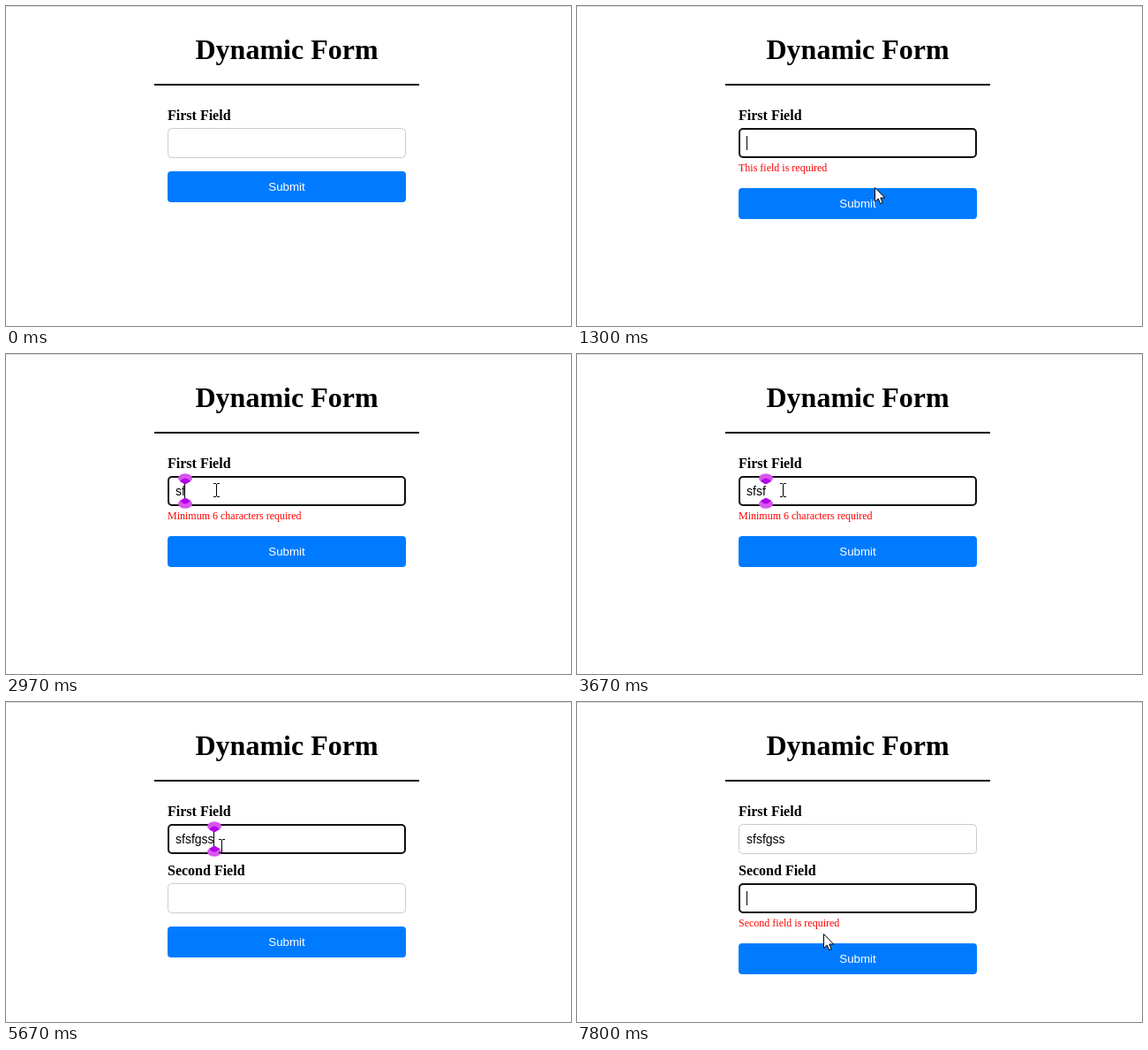
An HTML page with a canvas that plays this animation: 640 px wide and 362 px high, repeating every 8000 ms.

```html
<!DOCTYPE html>
<html lang="en">
<head>
<meta charset="utf-8">
<title>Dynamic Form</title>
<style>
html, body { margin: 0; width: 100%; height: 100%; overflow: hidden; background: #fff; }
canvas { display: block; }
</style>
</head>
<body>
<canvas id="stage" width="640" height="362"></canvas>
<script>
const ctx = document.getElementById('stage').getContext('2d');
const LOOP = 8000, BLINK = 515;
const SERIF = '"Liberation Serif", "Times New Roman", serif';
const SANS = '"Liberation Sans", Arial, sans-serif';
const LEFT = 183, WIDTH = 270, TEXT_X = 192;
const FIRST_Y = 138, SECOND_Y = 205;

// Time, typed text
const typing = [[2770, 's'], [2900, 'sf'], [3030, 'sfs'], [3155, 'sfsf'],
  [5130, 'sfsfg'], [5430, 'sfsfgs'], [5615, 'sfsfgss']];

// Time, pointer x, pointer y
const route = [[470, 331, 325], [700, 336, 169], [870, 339, 217],
  [1030, 339, 217], [1100, 337, 205], [1600, 337, 205], [1970, 238, 154],
  [3080, 238, 154], [3230, 233, 154], [3670, 233, 154], [3800, 247, 182],
  [4030, 247, 182], [4110, 255, 186], [4230, 247, 166], [4530, 247, 166],
  [4730, 244, 163], [6690, 244, 163], [6900, 199, 225],
  [7060, 199, 225], [7330, 279, 262]];

const arrowShape = new Path2D('M.5 .5V16.5L4.2 13L6.7 18.6L9.2 17.5L6.8 12H11.7Z');
const handShape = new Path2D('M-2 14V1.9a1.8 1.8 0 0 1 3.6 0V7.5a1.6 1.6 0 0 1 3.2 .5' +
  'a1.6 1.6 0 0 1 3.2 .7a1.4 1.4 0 0 1 2.6 1V15q0 3-2 6.5H-1q-1-3-4.1-7.5' +
  'q-1-2 .6-2.6q1.4-.3 2.5 2.6z');

function pointerAt(t) {
  if (t < route[0][0]) return null;
  let i = route.length - 1;
  while (route[i][0] > t) i--;
  const [t0, x0, y0] = route[i];
  if (i === route.length - 1) return { x: x0, y: y0 };
  const [t1, x1, y1] = route[i + 1];
  const p = (t - t0) / (t1 - t0);
  const k = p * p * (3 - 2 * p);
  return { x: Math.round(x0 + (x1 - x0) * k), y: Math.round(y0 + (y1 - y0) * k) };
}

function stateAt(t) {
  let value = '', reset = 1300;
  for (const [time, text] of typing) {
    if (t >= time) { value = text; reset = time; }
  }
  if (t >= 7800) reset = 7800;
  const two = value.length >= 6;
  let focus = 0;
  if (t >= 7800) focus = 2;
  else if (t >= 1300 && t < 7700) focus = 1;
  let error = '';
  if (t >= 7800) error = 'Second field is required';
  else if (t >= 1300 && !two) error = value ? 'Minimum 6 characters required' : 'This field is required';
  const lastY = two ? SECOND_Y : FIRST_Y;
  return { value, two, focus, error, lastY,
    buttonY: lastY + (error ? 68 : 49),
    caretOn: Math.floor((t - reset) / BLINK) % 2 === 0,
    pointer: pointerAt(t) };
}

function write(text, x, y, font, color = '#000', align = 'left') {
  ctx.font = font;
  ctx.fillStyle = color;
  ctx.textAlign = align;
  ctx.fillText(text, x, y);
}

function roundBox(x, y, w, h, r) {
  ctx.beginPath();
  ctx.roundRect(x, y, w, h, r);
}

function inside(p, x, y, w, h) {
  return p.x >= x && p.x < x + w && p.y >= y && p.y < y + h;
}

function drawField(label, y, value, focused, caretOn) {
  write(label, LEFT, y - 9, 'bold 16px ' + SERIF);
  const inset = focused ? 1 : 0.5;
  roundBox(LEFT + inset, y + inset, WIDTH - 2 * inset, 34 - 2 * inset, 4);
  ctx.lineWidth = 2 * inset;
  ctx.strokeStyle = focused ? '#101010' : '#ccc';
  ctx.stroke();
  write(value, TEXT_X, y + 22, '14px ' + SANS);
  const caretX = Math.floor(TEXT_X + ctx.measureText(value).width);
  if (focused && caretOn) ctx.fillRect(caretX, y + 9, 1, 16);
  return caretX;
}

function drawMarker(x, y, dir) {
  ctx.save();
  ctx.translate(x, y);
  ctx.scale(1, dir);
  ctx.fillStyle = '#d855ee';
  ctx.beginPath();
  ctx.ellipse(0, 5.5, 8, 5.2, 0, 0, Math.PI * 2);
  ctx.fill();
  ctx.fillStyle = '#b400e6';
  ctx.beginPath();
  ctx.moveTo(-6, 9);
  ctx.quadraticCurveTo(0, 2, 6, 9);
  ctx.lineTo(1, 12);
  ctx.lineTo(-1, 12);
  ctx.fill();
  ctx.restore();
}

function drawPopup(alpha) {
  ctx.save();
  ctx.globalAlpha = alpha;
  ctx.fillStyle = '#fff';
  ctx.shadowColor = 'rgba(0,0,0,.28)';
  ctx.shadowBlur = 4;
  ctx.shadowOffsetY = 1;
  roundBox(282, 181, 156, 44, 7);
  ctx.fill();
  ctx.shadowColor = 'transparent';
  ctx.beginPath();
  ctx.moveTo(296, 182);
  ctx.lineTo(305, 175);
  ctx.lineTo(314, 182);
  ctx.fill();
  write('gjfgj', 294, 208, '14px "Open Sans", "Noto Sans", sans-serif', '#202124');
  ctx.strokeStyle = '#474747';
  ctx.lineWidth = 1.7;
  ctx.beginPath();
  ctx.moveTo(411.5, 198.5);
  ctx.lineTo(420.5, 207.5);
  ctx.moveTo(420.5, 198.5);
  ctx.lineTo(411.5, 207.5);
  ctx.stroke();
  ctx.restore();
}

function drawIBeam() {
  ctx.fillStyle = '#000';
  ctx.fillRect(0, -7, 1, 14);
  for (const y of [-8, 7]) {
    ctx.fillRect(-3, y, 3, 1);
    ctx.fillRect(1, y, 3, 1);
  }
}

function drawPointer(p, s, hover) {
  const overText = inside(p, LEFT, FIRST_Y, WIDTH, 34) ||
    inside(p, LEFT, 115, 72, 18) ||
    s.two && (inside(p, LEFT, SECOND_Y, WIDTH, 34) || inside(p, LEFT, 182, 88, 18)) ||
    s.error && inside(p, LEFT, s.lastY + 38, 150, 15);
  ctx.save();
  ctx.translate(p.x, p.y);
  if (overText) {
    drawIBeam();
  } else {
    const shape = hover ? handShape : arrowShape;
    ctx.fillStyle = '#fff';
    ctx.fill(shape);
    ctx.strokeStyle = '#000';
    ctx.lineWidth = 1;
    ctx.stroke(shape);
    if (hover) {
      ctx.fillStyle = '#000';
      for (const x of [1, 4, 7]) ctx.fillRect(x, 8, 1, 4);
    }
  }
  ctx.restore();
}

function draw(t) {
  const s = stateAt(t), p = s.pointer;
  ctx.fillStyle = '#fff';
  ctx.fillRect(0, 0, 640, 362);
  ctx.fillStyle = '#dcdcdc';
  ctx.fillRect(0, 0, 640, 1);
  write('Dynamic Form', 318, 60, 'bold 32px ' + SERIF, '#000', 'center');
  ctx.fillRect(168, 88, 300, 2);

  const caretX = drawField('First Field', FIRST_Y, s.value, s.focus === 1, s.caretOn);
  if (s.two) drawField('Second Field', SECOND_Y, '', s.focus === 2, s.caretOn);
  if (s.error) write(s.error, LEFT, s.lastY + 49, '12px ' + SERIF, '#f00');

  const hover = p && inside(p, LEFT, s.buttonY, WIDTH, 35);
  ctx.fillStyle = hover ? '#0056b3' : '#007bff';
  roundBox(LEFT, s.buttonY, WIDTH, 35, 4);
  ctx.fill();
  write('Submit', 318, s.buttonY + 22, '13.333px ' + SANS, '#fff', 'center');

  if (s.focus === 1 && t >= 2900) {
    drawMarker(caretX + 1, 135, 1);
    drawMarker(caretX + 1, 175, -1);
  }
  if (t >= 2770 && t < 2970) drawPopup(Math.min(1, (2970 - t) / 100));
  if (p) drawPointer(p, s, hover);
}

function tick() {
  draw(performance.now() % LOOP);
  requestAnimationFrame(tick);
}
tick();
</script>
</body>
</html>
```
